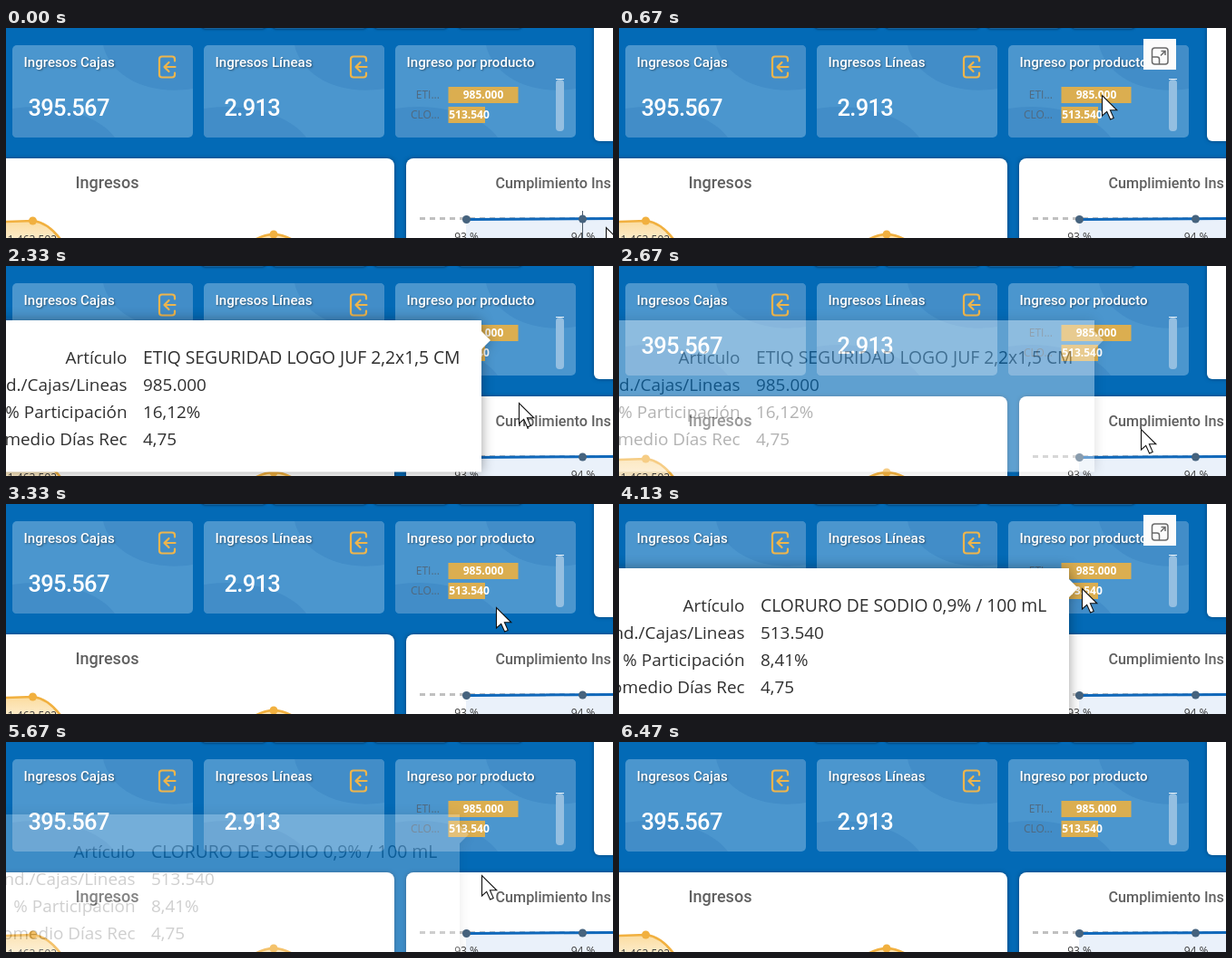
These frames come from a looping animation (669x232 px, 7.27 s). An HTML page:

```html
<!DOCTYPE html>
<html lang="es">
<head>
<meta charset="utf-8">
<title>Panel de ingresos</title>
<style>
  html, body { margin: 0; width: 100%; height: 100%; overflow: hidden; background: #036ab6; }
  svg { display: block; width: 669px; height: 232px; }
  text { font-family: Roboto, sans-serif; }
  .head { font-size: 15.1px; font-weight: 500; fill: #fff; text-shadow: 1px 1px 2px rgba(0, 0, 0, .45); }
  .big { font-size: 25.5px; font-weight: 500; letter-spacing: -.7px; fill: #fff; }
  .title { font-weight: 500; fill: #606060; }
  .bar { font: bold 12px "Open Sans", sans-serif; fill: #fff; text-anchor: middle; }
  .cat { font: 12px "Open Sans", sans-serif; fill: #50697f; text-anchor: end; }
  .axis { font: 500 12px "Open Sans", sans-serif; fill: #3a3a3a; text-anchor: middle; }
  .tip { filter: drop-shadow(0 0 7px rgba(0, 0, 0, .38)); }
  .tip text { font: 18.9px "Open Sans", sans-serif; fill: #303030; }
  .tip .label { text-anchor: end; }
  .tip .name { font-size: 19.3px; }
  .panel { fill: #fff; filter: drop-shadow(0 0 2px rgba(0, 30, 60, .55)); }
  .tab { fill: #2f80c0; filter: drop-shadow(0 1px 1px rgba(0, 30, 60, .6)); }
</style>
</head>
<body>
<svg id="stage" viewBox="0 0 669 232">
  <defs>
    <linearGradient id="gold" x1="0" y1="0" x2="0" y2="1">
      <stop offset="0" stop-color="#fbdc9f"/><stop offset="1" stop-color="#fdeed0"/>
    </linearGradient>
    <g id="card">
      <rect width="199" height="102" rx="5" fill="#4b96ce"/>
      <path d="M100 0C108 34 148 56 199 48V5Q199 0 194 0Z" fill="#428dc8"/>
      <path d="M0 70C48 62 96 78 113 102H5Q0 102 0 97Z" fill="#428dc8"/>
    </g>
    <g id="enter" fill="none" stroke="#eeb54c" stroke-width="2.2" stroke-linecap="round" stroke-linejoin="round">
      <path d="M17 5V3Q17 0 14 0H3Q0 0 0 3V20Q0 23 3 23H14Q17 23 17 20V18"/>
      <path d="M17.500 11.5H6M10.500 6.5L5.500 11.5L10.500 16.5"/>
    </g>
  </defs>

  <rect width="669" height="232" fill="#036ab6"/>
  <path class="tab" d="M215 -3H287Q286 .5 282 .5H220Q216 .5 215 -3ZM293 -3H398Q397 .5 393 .5H298Q294 .5 293 -3ZM405 -3H487Q486 .5 482 .5H410Q406 .5 405 -3ZM498 -3H569Q568 .5 564 .5H503Q499 .5 498 -3Z"/>
  <rect class="panel" x="648" y="-20" width="60" height="145" rx="6"/>

  <use href="#card" x="7" y="19"/>
  <use href="#card" x="218" y="19"/>
  <use href="#card" x="429" y="19"/>
  <text class="head" x="19.5" y="43">Ingresos Cajas</text>
  <text class="head" x="230.5" y="43">Ingresos Líneas</text>
  <text class="head" x="441.5" y="43">Ingreso por producto</text>
  <use href="#enter" x="169" y="31.5"/>
  <use href="#enter" x="380" y="31.5"/>
  <text class="big" x="24.5" y="96.5">395.567</text>
  <text class="big" x="240.5" y="96.5">2.913</text>

  <path d="M487.500 65H564.500V83H487.500ZM487.500 87H528V105H487.500Z" fill="#dbae50"/>
  <text class="cat" x="478" y="78">ETI...</text>
  <text class="cat" x="478" y="100">CLO...</text>
  <text class="bar" x="526" y="78">985.000</text>
  <text class="bar" x="510.5" y="100">513.540</text>
  <rect x="606" y="57" width="9" height="57" rx="4" fill="#94bfe1"/>
  <path d="M606 56.5H615" stroke="#e8f1f8"/>

  <rect class="panel" x="-20" y="144" width="448" height="110" rx="8"/>
  <rect class="panel" x="441" y="144" width="260" height="110" rx="8"/>
  <text class="title" x="76.5" y="177" font-size="18">Ingresos</text>
  <text class="title" x="539.5" y="177" font-size="16.2">Cumplimiento Ins</text>

  <path d="M0 214L30 213Q47 215 62 236H0Z" fill="url(#gold)"/>
  <path d="M268 238Q282 228 295 228T322 238Z" fill="url(#gold)"/>
  <g fill="none" stroke="#f1b03f" stroke-width="2.6">
    <path d="M-2 214L30 213Q47 215 62 236"/>
    <path d="M268 238Q282 228 295 228T322 238"/>
  </g>
  <circle cx="29.5" cy="213" r="4.5" fill="#f1b03f"/>
  <circle cx="295" cy="228" r="4.5" fill="#f1b03f"/>
  <text class="axis" x="29" y="238">1.463.592</text>

  <path d="M507 211L669 210V232H507Z" fill="#eaf1fa"/>
  <path d="M456 210.5H669" stroke="#c0c0c0" stroke-width="3" stroke-dasharray="6 5"/>
  <path d="M507 211.5L669 210.5" stroke="#1068ba" stroke-width="3"/>
  <path id="guide" d="M635.5 202V232" stroke="#4a5a68"/>
  <circle cx="507.5" cy="211.5" r="4.5" fill="#46637e"/>
  <circle cx="635.5" cy="211" r="4.5" fill="#46637e"/>
  <text class="axis" x="507.5" y="235">93 %</text>
  <text class="axis" x="636" y="235">94 %</text>

  <g id="expand">
    <rect x="578" y="12" width="36" height="34" fill="#fbfbfb"/>
    <g fill="none" stroke="#6a6a6a" stroke-width="1.5">
      <rect x="587.5" y="22" width="17.5" height="18" rx="3"/>
      <path d="M587.5 32H593Q595.5 32 595.5 34.500V40M597 30.500L602 25.500M597.500 25.500H602V30"/>
    </g>
  </g>
  <g id="tips"></g>
  <path id="cursor" d="M.5 .5V23L5.7 18.3L9.6 27L13.2 25.4L9.4 16.8H16.8Z" fill="#fff" stroke="#111" stroke-width="1.1"/>
</svg>

<script>
const LOOP = 7270, STEP = 1000 / 15;
const $ = id => document.getElementById(id);

// Pointer path: [step, x, y]
const path = [
  [0, 661, 220], [1, 657, 214], [4, 610, 157], [7, 554, 96], [10, 532, 74], [29, 532, 74],
  [30, 532, 75], [31, 538, 84], [33, 554, 124], [36, 570, 165], [40, 575, 180], [42, 575, 183],
  [45, 567, 170], [48, 549, 131], [50, 540, 114], [51, 537, 110], [54, 518, 98], [56, 510, 93],
  [75, 510, 93], [77, 514, 102], [80, 523, 135], [84, 524, 146], [86, 524, 147], [87, 524, 149],
  [91, 524, 149], [92, 500, 156], [93, 430, 178], [94, 294, 214], [95, 240, 250]
];

const labels = ["Artículo", "Und./Cajas/Lineas", "% Participación", "Promedio Días Rec"];

const tips = [
  { show: 16, leave: 31, fade: 37.2, left: -372, lift: 24, rows: ["ETIQ SEGURIDAD LOGO JUF 2,2x1,5 CM", "985.000", "16,12%", "4,75"] },
  { show: 62, leave: 77, fade: 81.6, left: -339, lift: 22, rows: ["CLORURO DE SODIO 0,9% / 100 mL", "513.540", "8,41%", "4,75"] }
];
const FADE = 4.4;

// Tooltip coordinates are relative to its top right corner
function buildTip(tip) {
  const g = document.createElementNS("http://www.w3.org/2000/svg", "g");
  g.setAttribute("class", "tip");
  const rows = tip.rows.map((value, i) => {
    const y = 48 + 30 * i;
    return `<text class="label" x="${tip.left - 18.5}" y="${y}">${labels[i]}</text>` +
      `<text class="${i ? "value" : "name"}" x="${tip.left - 1}" y="${y}">${value}</text>`;
  });
  g.innerHTML = `<path d="M-560 0H0V12L10 22L0 32V167.5H-560Z" fill="#fff"/>` + rows.join("");
  $("tips").append(g);
  tip.node = g;
}

function pointer(k) {
  const i = path.findIndex(p => p[0] > k);
  if (i < 0) return path[path.length - 1].slice(1);
  const [k0, x0, y0] = path[i - 1], [k1, x1, y1] = path[i];
  const u = (k - k0) / (k1 - k0);
  return [Math.round(x0 + (x1 - x0) * u), Math.round(y0 + (y1 - y0) * u)];
}

const toggle = (node, on) => node.setAttribute("visibility", on ? "visible" : "hidden");
const move = (node, x, y) => node.setAttribute("transform", `translate(${x} ${y})`);

function draw(time) {
  const k = Math.floor((time % LOOP + 4) / STEP);
  const [x, y] = pointer(k);
  move($("cursor"), x, y);
  toggle($("cursor"), k < 95);
  toggle($("guide"), k < 2);
  toggle($("expand"), (k >= 6 && k < 33) || (k >= 51 && k < 79));
  for (const tip of tips) {
    const alpha = Math.max(0, Math.min(1, 1 - (k - tip.fade) / FADE));
    const [px, py] = pointer(Math.min(k, tip.leave));
    move(tip.node, px - 14, py - tip.lift);
    tip.node.style.opacity = alpha;
    toggle(tip.node, k >= tip.show && alpha > 0);
  }
}

tips.forEach(buildTip);
const start = performance.now();
function tick() {
  draw(performance.now() - start);
  requestAnimationFrame(tick);
}
tick();
</script>
</body>
</html>
```
